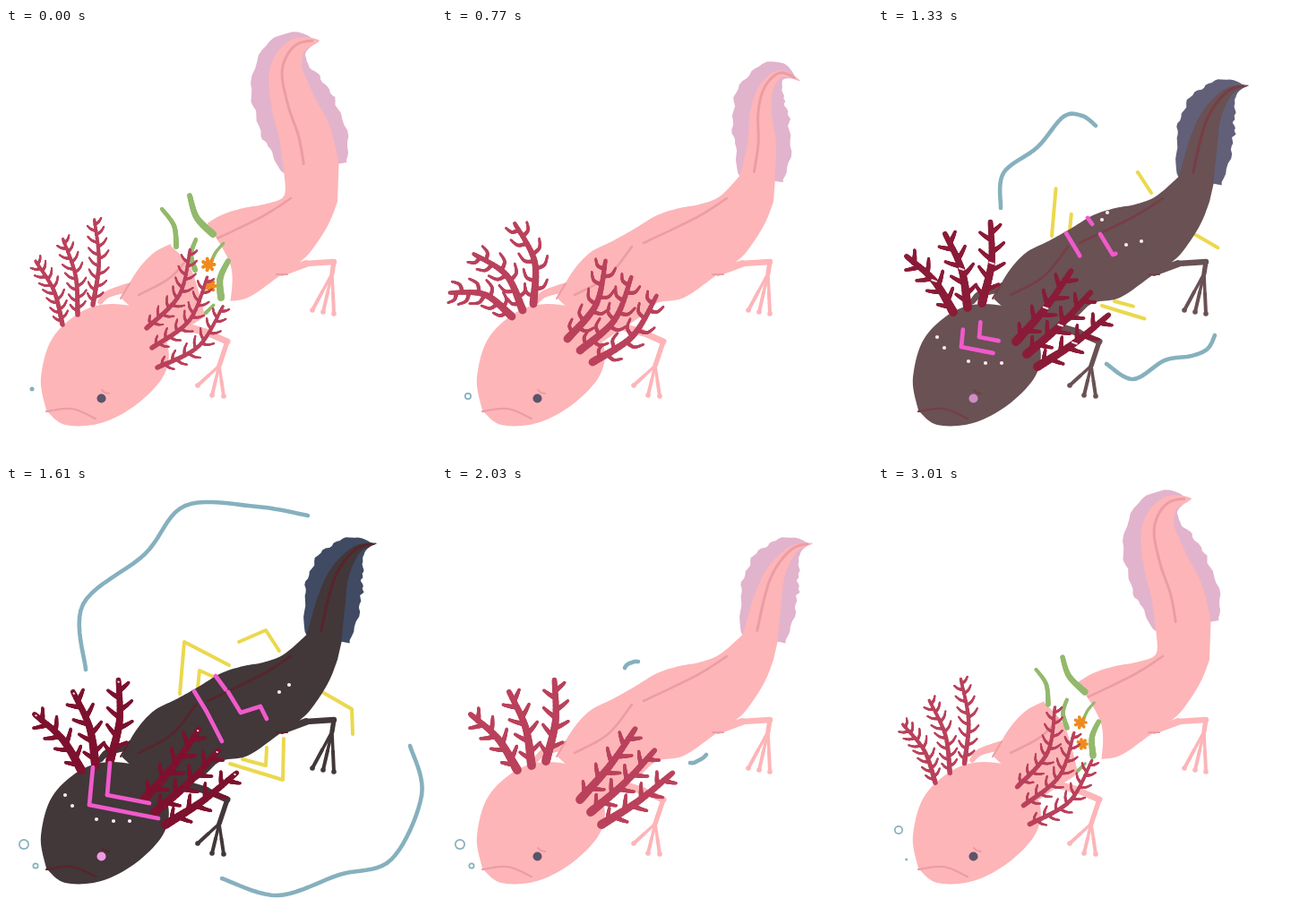
Animation, 480 px wide and 480 px high, one loop 3080 ms. Source, as an HTML page with a canvas:

```html
<!DOCTYPE html>
<html lang="en">
<head>
<meta charset="utf-8">
<title>Axolotl</title>
<style>
html, body { margin: 0; width: 100%; height: 100%; overflow: hidden; background: #fff; }
canvas { display: block; width: 480px; height: 480px; }
</style>
</head>
<body>
<canvas id="stage" width="480" height="480"></canvas>
<script>
const ctx = document.getElementById('stage').getContext('2d');
const LOOP = 3080, STEP = 70, DEG = Math.PI / 180, TEAL = '#86b0be';

const lerp = (a, b, u) => Array.isArray(a) ? a.map((v, i) => lerp(v, b[i], u)) : a + (b - a) * u;
const clamp = u => Math.max(0, Math.min(1, u));

// keys: [time, value] pairs in order of time
function tween(t, keys) {
  if (t <= keys[0][0]) return keys[0][1];
  for (let i = 1; i < keys.length; i++) {
    const [t0, a] = keys[i - 1], [t1, b] = keys[i];
    if (t <= t1) return lerp(a, b, (t - t0) / (t1 - t0));
  }
  return keys[keys.length - 1][1];
}

const pairs = f => f.reduce((r, v, i) => (i % 2 ? r[r.length - 1].push(v) : r.push([v]), r), []);

// Catmull-Rom curve through a flat list of points, as a polyline
function spline(flat, n = 10) {
  const p = pairs(flat), out = [], last = p.length - 1;
  for (let i = 0; i < last; i++) {
    const a = p[Math.max(i - 1, 0)], b = p[i], c = p[i + 1], d = p[Math.min(i + 2, last)];
    for (let j = 0; j < n; j++) {
      const u = j / n;
      out.push([0, 1].map(k => b[k] + 0.5 * u * (c[k] - a[k] + u * (2 * a[k] - 5 * b[k] + 4 * c[k] - d[k] +
        u * (3 * (b[k] - c[k]) + d[k] - a[k])))));
    }
  }
  out.push(p[last]);
  return out;
}

// Curve between two points, bulging sideways by bend
function arc(x0, y0, x1, y1, bend) {
  const len = Math.hypot(x1 - x0, y1 - y0), k = bend / len;
  return spline([x0, y0, (x0 + x1) / 2 - (y1 - y0) * k, (y0 + y1) / 2 + (x1 - x0) * k, x1, y1], 12);
}

function trace(pts) {
  ctx.beginPath();
  pts.forEach(p => ctx.lineTo(p[0], p[1]));
}
function fill(pts, color) {
  trace(pts);
  ctx.fillStyle = color;
  ctx.fill();
}
function stroke(pts, color, width) {
  trace(pts);
  ctx.strokeStyle = color;
  ctx.lineWidth = width;
  ctx.stroke();
}
function taper(pts, w0, w1, color) {
  for (let i = 1; i < pts.length; i++)
    stroke([pts[i - 1], pts[i]], color, lerp(w0, w1, i / pts.length));
}
function dot(x, y, r, color) {
  ctx.beginPath();
  ctx.arc(x, y, r, 0, 7);
  ctx.fillStyle = color;
  ctx.fill();
}

// First part of a polyline
function trim(pts, part) {
  const dist = (a, b) => Math.hypot(b[0] - a[0], b[1] - a[1]);
  let left = part * pts.slice(1).reduce((s, p, i) => s + dist(pts[i], p), 0);
  const out = [pts[0]];
  for (let i = 1; i < pts.length && left > 0; i++) {
    const d = dist(pts[i - 1], pts[i]);
    out.push(lerp(pts[i - 1], pts[i], Math.min(1, left / d)));
    left -= d;
  }
  return out;
}

// tail: midline from base to tip; girth: half width at the base, taper power
// gills: first base x, y, base step x, y, first angle, angle step, length, length step, bend
const poses = {
  up: {
    tail: [341,157, 334,120, 321,85, 313,47, 325,21, 350,14], girth: [31, 1.8],
    left: [63,331, 17,-11, -113,12, 77,9, 6], right: [157,335, 6,22, -61,9, 100,0, 14],
    barbs: [7, 13, 3, 0.35, 5.5]
  },
  hook: {
    tail: [352,168, 357,130, 356,94, 362,67, 378,51, 400,59], girth: [20, 1],
    left: [78,322, 12,-7, -159,28, 74,9, 12], right: [140,347, 14,13, -64,9, 97,3, 12],
    barbs: [4.5, 18, 4, 0.75, 9]
  },
  out: {
    tail: [355,170, 363,129, 370,103, 381,83, 395,69, 414,64], girth: [20, 1],
    left: [84,317, 16,-5, -130,23, 81,5, 6], right: [154,350, 12,14, -52,8, 100,-1, 3],
    barbs: [4.2, 16, 5, 0.1, 10]
  },
  back: {
    tail: [352,159, 348,126, 341,96, 345,68, 361,49, 391,42], girth: [20, 1],
    left: [71,332, 11,-9, -163,23, 57,16, 12], right: [146,341, 13,13, -91,13, 86,5, 15],
    barbs: [4.5, 16, 4, 0.75, 10]
  }
};
function posed(t, part, end) {
  const swing = [[0, 'up'], [700, 'hook'], [770, 'hook'], [1050, 'out'], [2100, 'out'], [2520, 'back'], [end, 'up']];
  return tween(t, swing.map(([time, name]) => [time, poses[name][part]]));
}

// Edges of the tail and its fin, set off sideways from the midline
function tailEdges(mid, [girth, power]) {
  const line = spline(mid, 8), n = line.length - 1;
  const offset = width => line.map((p, i) => {
    const a = line[Math.max(i - 1, 0)], b = line[Math.min(i + 1, n)];
    const len = Math.hypot(b[0] - a[0], b[1] - a[1]), u = i / n;
    const w = width(u, girth * (1 - u ** power), i);
    return [p[0] + (b[1] - a[1]) / len * w, p[1] - (b[0] - a[0]) / len * w];
  });
  const wavy = (i, v) => 1.3 * v * (Math.sin(i * 0.7) + Math.sin(i * 1.7 + 1));
  const flap = (u, low, power) => {
    const v = Math.sin(Math.PI * Math.min(1, low + (1 - low) * u / 0.92));
    return Math.max(0, v) ** power;
  };
  return {
    left: offset((u, w) => w),
    right: offset((u, w) => -w).reverse(),
    finLeft: offset((u, w, i) => w + 20 * flap(u, 0, 0.8) + wavy(i, flap(u, 0, 1))),
    finRight: offset((u, w, i) => -w - 18 * flap(u, 0.2, 1.2) - wavy(i + 5, flap(u, 0.2, 1))).reverse(),
    ridge: offset((u, w) => w * 0.25).slice(2, n - 2)
  };
}

function gill(line, [count, len, thick, curl, width], color, mark) {
  const n = line.length - 1;
  taper(line, width, thick * 1.1, color);
  for (let i = 0; i < count * 2; i++) {
    const s = (i + 1.4) / (count * 2 + 1.4);
    if (s > 0.95) continue;
    const side = i % 2 ? 1 : -1, k = Math.floor(s * n), p = line[k], q = line[k + 1];
    const turn = Math.atan2(q[1] - p[1], q[0] - p[0]) + side * (0.95 - curl * 0.15);
    const size = len * (0.7 + 0.4 * Math.sin(s * Math.PI));
    const barb = arc(p[0], p[1], p[0] + Math.cos(turn) * size, p[1] + Math.sin(turn) * size, side * curl * size * 0.3);
    taper(barb, thick * 1.2, thick * 0.6, color);
  }
  if (mark > 0.2) {
    const [x, y] = line[Math.round(mark * n)], r = 5 * (1 - mark);
    stroke([[x - r, y - r / 3], [x + r, y + r / 3]], '#f3e6e8', 2);
  }
}

function gills([x, y, dx, dy, angle, turn, len, grow, bend], style, color, mark) {
  for (let i = 0; i < 3; i++) {
    const a = (angle + turn * i) * DEG, l = len + grow * i, bx = x + dx * i, by = y + dy * i;
    gill(arc(bx, by, bx + Math.cos(a) * l, by + Math.sin(a) * l, bend), style, color, mark);
  }
}

const seam = [204,228, 230,266, 238,318];
function gap(k) {
  if (k <= 0) return;
  const front = spline(lerp(seam, [184,243, 207,270, 223,325], k));
  const rear = spline(lerp(seam, [225,219, 251,266, 250,310], k)).reverse();
  fill([[front[0][0], front[0][1] - 14], ...front, ...rear, [rear[rear.length - 1][0], 204]], '#fff');
}

// Leaf: root, end, bend, width
const leaves = [
  [190,244, 174,202, 6, 6], [231,230, 205,187, -6, 8], [211,270, 212,236, -5, 6],
  [228,264, 243,240, -2, 4], [240,301, 248,260, -5, 8], [223,318, 232,309, 0, 4]
];
function plants(k) {
  if (k <= 0) return;
  leaves.forEach(l => taper(trim(arc(...l.slice(0, 5)), k), l[5] * k, l[5] * k * 0.7, '#93b96c'));
  [[226, 264, 6.5], [228, 288, 5.5]].forEach(([x, y, r]) => {
    for (let a = 0; a < 6; a += 0.9)
      stroke([[x, y], [x + Math.cos(a) * r * k, y + Math.sin(a) * r * k]], '#f08a1d', 4 * k);
  });
}

// Each wave: short stroke by the body, then wider and wider
const waves = [
  [[204,203, 206,200, 209,198, 212,197, 215,196, 219,196],
    [137,201, 140,162, 178,133, 207,99, 228,98, 243,109],
    [89,205, 86,132, 155,76, 200,22, 280,23, 337,33]],
  [[277,309, 281,309, 285,307, 289,305, 292,303, 295,300],
    [255,375, 285,392, 320,371, 350,366, 368,358, 376,343],
    [241,438, 303,457, 372,434, 430,417, 464,345, 451,290]]
];
const zigzags = [
  [194,232, 199,174, 249,200], [214,226, 216,206, 234,214], [305,184, 290,161, 260,174],
  [353,230, 386,249, 387,277], [250,310, 309,328, 310,282], [264,305, 290,312, 291,292]
];
const stripes = [
  [93,356, 97,314], [93,356, 170,371], [113,345, 116,309], [113,345, 160,354],
  [210,229, 224,252, 241,285], [234,212, 245,227], [248,230, 262,253, 284,246, 291,260]
];
function glow(part) {
  if (part <= 0) return;
  stripes.forEach(s => stroke(trim(pairs(s), part), '#f05acb', 4.7));
  const spots = part < 0.75 ? [250,214, 256,206, 277,242, 294,238] : [305,230, 316,222];
  pairs([66,345, 74,357, 101,372, 120,374, 138,374, ...spots]).forEach(([x, y]) => dot(x, y, 2.1, '#fbeaf2'));
}

// Bubble from the mouth: birth, rise time, time at the top, place, radius
const bubbles = [
  [2975, 105, 70, 29, 403, 2.5], [560, 210, 140, 29, 411, 4], [1400, 210, 490, 20, 400, 6],
  [1540, 70, 490, 33, 424, 3.5], [2450, 560, 0, 23, 384, 5]
];
function drawBubbles(t) {
  bubbles.forEach(([born, rise, hold, x, y, size]) => {
    const age = (t - born + LOOP) % LOOP;
    if (age > rise + hold) return;
    const u = clamp(age / rise), r = size * Math.sqrt(u);
    const bx = lerp(33, x, u), by = lerp(424, y, u);
    dot(bx, by, r, TEAL);
    if (r > 2.6) dot(bx, by, r - 1.7, '#fff');
  });
}

function leg(joints, width, toes, color) {
  const line = pairs(joints), foot = line[line.length - 1];
  taper(line, width, 4, color);
  toes.forEach(toe => {
    taper([foot, lerp(foot, toe, 0.5), toe], 3, 4.5, color);
    dot(...toe, 2.8, color);
  });
}

const back = [129,302, 145,273, 165,251, 190,238, 215,224, 240,209, 265,201, 287,197, 310,188];
const belly = [370,194, 361,217, 347,240, 332,258, 305,277, 270,301, 240,307, 222,322, 200,336, 180,350];
const head = [45,427, 39,390, 54,343, 97,311, 150,314, 179,350, 177,386, 146,420, 106,441, 66,443, 45,427];

function draw(t) {
  const dark = tween(t, [[1050, 0], [1330, 0.79], [1610, 1], [1820, 0.79], [2030, 0]]);
  const wave = tween(t, [[1050, 0], [1610, 2], [2030, 0]]);
  const part = tween(t, [[1090, 0], [1610, 1], [2000, 0]]);
  const open = tween(t, [[0, 1], [560, 0], [2590, 0], [3010, 0.92], [3080, 1]]);
  const tone = (a, b) => `rgb(${lerp(a, b, dark).map(Math.round)})`;
  const skin = tone([253, 181, 184], [66, 55, 57]);
  const crease = tone([235, 157, 163], [88, 36, 44]);
  const frill = tone([186, 66, 92], [126, 18, 47]);

  ctx.fillStyle = '#fff';
  ctx.fillRect(0, 0, 480, 480);
  ctx.lineCap = ctx.lineJoin = 'round';

  if (t > 1050 && t < 2100)
    waves.forEach(w => stroke(spline(tween(wave, w.map((pts, i) => [i, pts]))), TEAL, 4.6));
  if (part > 0) zigzags.forEach(z => stroke(trim(pairs(z), part), '#ebd84d', 4));

  // Tail and body
  const tail = tailEdges(posed(t, 'tail', 2870), posed(t, 'girth', 2870));
  fill([...tail.finLeft, ...tail.finRight], tone([226, 179, 204], [64, 74, 98]));
  fill([...spline([...back, ...tail.left[0]]), ...tail.left, ...tail.right, ...spline(belly)], skin);
  stroke(tail.ridge, crease, 3);
  stroke(spline([318,190, 285,211, 225,240]), crease, 2.6);
  stroke(arc(212, 244, 148, 298, -8), crease, 2.6);
  gap(open);
  plants(open);

  // Limbs
  taper(spline([136,290, 114,297, 105,306]), 10, 5, skin);
  leg([308,273, 335,263, 366,261, 364,274], 9, [[342, 315], [354, 317], [366, 319]], skin);
  stroke([[302, 275], [314, 275]], crease, 2);
  leg([200,333, 224,340, 247,350, 238,377], 10, [[214, 399], [230, 410], [243, 411]], skin);

  // Head
  fill(spline(head), skin);
  stroke(arc(128, 302, 138, 285, 0), crease, 2);
  stroke(arc(45, 428, 100, 436, -7), crease, 2.2);
  stroke(arc(107, 404, 115, 408, 1), crease, 2);
  dot(106.5, 413.5, 5, tone([91, 84, 106], [238, 155, 224]));

  const style = posed(t, 'barbs', 2940), mark = dark > 0.3 ? 0.15 + part * 0.8 : 0;
  ['left', 'right'].forEach(side => gills(posed(t, side, LOOP), style, frill, mark));
  glow(part);
  drawBubbles(t);
}

const start = performance.now();
function frame() {
  const t = (performance.now() - start) % LOOP;
  draw(Math.floor(t / STEP) * STEP);
  requestAnimationFrame(frame);
}
frame();
</script>
</body>
</html>
```
